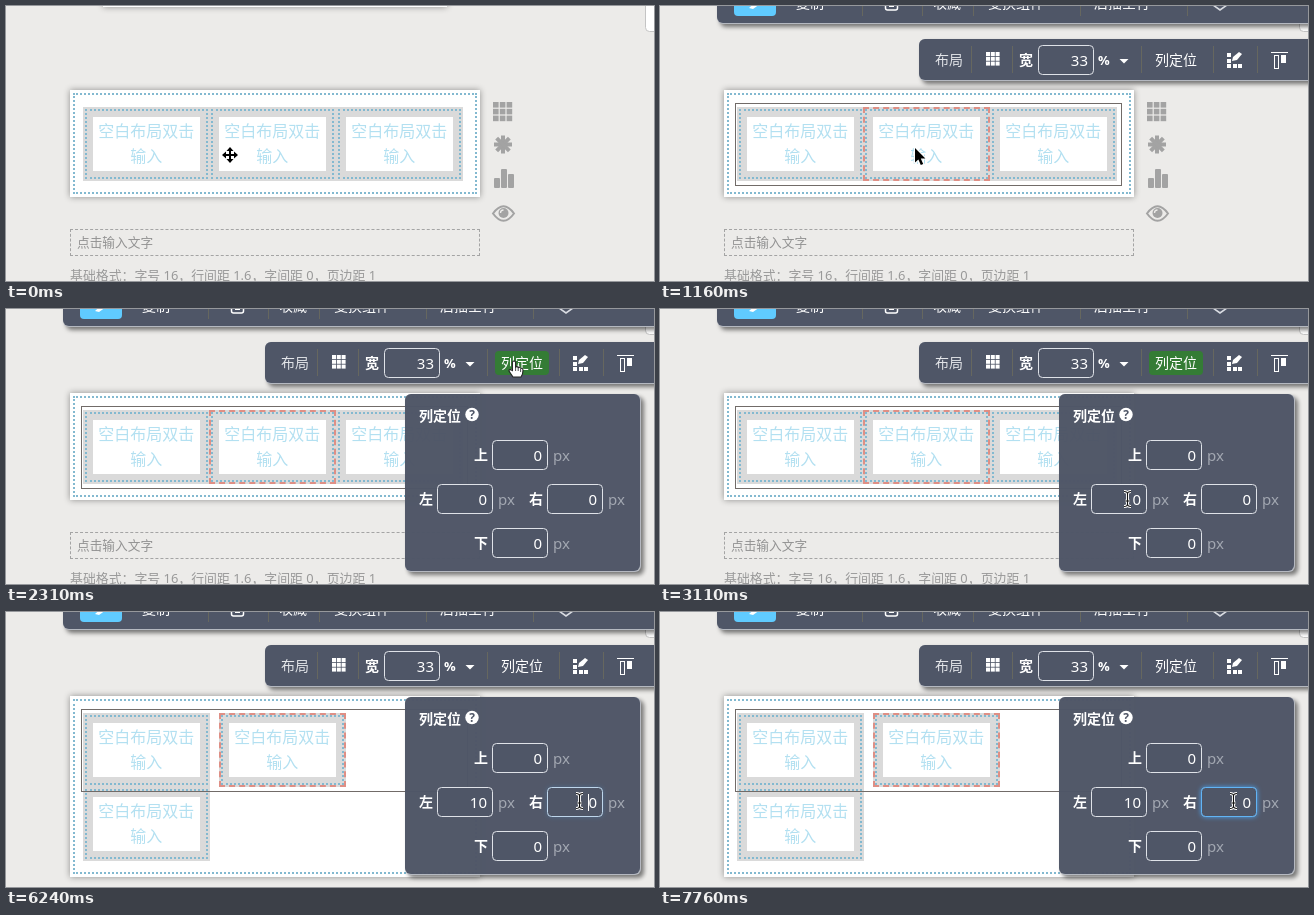
Animation of 648 by 275 pixels, one loop 8000 ms. Source, as an HTML page:

```html
<!DOCTYPE html>
<html lang="zh">
<head>
<meta charset="utf-8">
<style>
html, body { margin: 0; width: 100%; height: 100%; overflow: hidden; background: #ecebe9; }
svg { display: block; width: 648px; height: 275px; font-family: "Noto Sans", "Noto Sans CJK SC", sans-serif; }
.paper { filter: drop-shadow(0 0 3px rgba(0,0,0,.4)); }
.bar { filter: drop-shadow(3px 3px 2px rgba(0,0,0,.5)); }
.glow { filter: drop-shadow(0 0 2.5px #4aa3f0); }
.edge { box-sizing: border-box; width: 100%; height: 100%; }
</style>
</head>
<body>
<script>
const LOOP = 8000, DARK = '#4f5667', GREY = '#a3a3a3';

// Markup helpers
const rect = (x, y, w, h, fill, more = '') =>
  `<rect x="${x}" y="${y}" width="${w}" height="${h}" fill="${fill}" ${more}/>`;
const text = (x, y, s, size, fill, more = '') =>
  `<text x="${x}" y="${y}" font-size="${size}" fill="${fill}" ${more}>${s}</text>`;
const path = (d, fill, more = '') => `<path d="${d}" fill="${fill}" ${more}/>`;
const group = (id, body, more = '') => `<g id="${id}" ${more}>${body}</g>`;
const line = (color, w = 1) => `stroke="${color}" stroke-width="${w}"`;
const border = (x, y, w, h, style, id = '') =>
  `<foreignObject id="${id}" x="${x}" y="${y}" width="${w}" height="${h}">` +
  `<div class="edge" style="border:${style}"></div></foreignObject>`;
const grid = (x, y, size, step, fill) => [...Array(9).keys()]
  .map(i => rect(x + i % 3 * step, y + (i / 3 | 0) * step, size, size, fill)).join('');
const bold = 'font-weight="700"', medium = 'font-weight="500"';
const mid = 'text-anchor="middle"', end = 'text-anchor="end"';
const label = (x, y, s, weight = medium) => text(x, y, s, 14, '#fff', weight);
const DOTS = '2px dotted #83b9d0';

// Dark plate with a light lower right rim
const plate = (x, y, w, h) =>
  `<g class="bar">${rect(x, y, w, h, '#b4b8c0', 'rx="6"')}${rect(x, y, w - 1, h - 1, DARK, 'rx="6"')}</g>`;

function cell(i) {
  const x = Math.floor(77 + i * 126.67), c = x + 63.3;
  return group('cell' + i,
    rect(x, 101, 127, 74, '#dadada') +
    rect(x + 10, 111, 107, 54, '#fff') +
    border(x + 2, 103, 123, 70, DOTS) +
    (i == 1 ? border(x, 101, 127, 74, '2px dashed #df8f85', 'picked') : '') +
    text(c, 131, '空白布局双击', 16, '#b3e0f1', mid) +
    text(c, 156, '输入', 16, '#b3e0f1', mid));
}

function field(id, x, y, value) {
  const box = (color, more = '') =>
    rect(x + .5, y + .5, 55, 29, DARK, `rx="4" ${line(color)} ${more}`);
  return box('#dfe2e8') + box('#62b4f5', `id="${id}Glow" class="glow" opacity="0"`) +
    text(x + 50, y + 20.5, value, 15, '#fff', `id="${id}" ${medium} ${end}`);
}

const pxField = (id, x, y, name) =>
  label(x, y + 20, name, bold) + field(id, x + 18, y, '0') + text(x + 79, y + 20.5, 'px', 15, '#a2a7b1', medium);

const rules = (xs, y, h) => xs.map(x => rect(x, y, 1, h, '#66675f')).join('');

const page =
  rect(97, -20, 344, 21, '#fff', 'class="paper"') +
  rect(639.5, -10, 30, 35.5, '#fff', `rx="4" ${line('#c4c4c4')}`) +
  rect(64, 84, 410, 107, '#fff', 'id="sheet" class="paper"') +
  border(67, 87, 404, 101, DOTS, 'sheetDots') +
  cell(0) + cell(2) + cell(1) +
  rect(75.5, 97.5, 386, 82, 'none', `id="frame" ${line('#716b68')}`) +
  group('tools',
    grid(487, 96, 5.6, 6.8, GREY) +
    [0, 45, 90, 135].map(a => rect(495, 129.5, 4, 18, GREY, `transform="rotate(${a} 497 138.5)"`)).join('') +
    [[488, 172], [495, 163], [502, 168]].map(([x, y]) => rect(x, y, 6, 182 - y, GREY, 'rx="1"')).join('') +
    path('M487 207.5Q497.5 193 508 207.5Q497.5 222 487 207.5Z', 'none', line(GREY, 2)) +
    `<circle cx="497.5" cy="207" r="5" fill="${GREY}"/>` +
    path('M494.5 207a3 3 0 0 1 3-3', 'none', line('#ecebe9', 1.3))) +
  group('footer',
    border(64, 223, 410, 27, '1px dashed #a4a4a4') +
    text(71, 241, '点击输入文字', 12.7, '#929292', medium) +
    text(64, 274, '基础格式：字号 16，行间距 1.6，字间距 0，页边距 1', 12.9, '#999', medium));

const bars = group('bars',
  plate(57, -30, 700, 48) +
  rect(74, -20, 42, 30, '#60cbff', 'rx="4"') +
  path('M89 2l8-7l3 3l-7 5z', '#fff') +
  rules([202, 262, 313, 420, 527], -10, 20) +
  label(136, 2, '复制') + label(273, 2, '收藏') + label(328, 2, '变换组件') + label(434, 2, '后插空行') +
  rect(225.5, -9, 12, 13, 'none', `rx="2" ${line('#fff', 1.5)}`) + rect(229, -2, 5, 3, '#fff') +
  path('M553-1l7 5l7-5', 'none', line('#d9dce2', 1.6)) +
  plate(259, 33, 500, 42) +
  rules([311, 352, 481, 553, 597], 40, 27) +
  text(275, 59, '布局', 14, '#e3e5e9', medium) +
  grid(326, 46, 4, 4.8, '#fff') +
  label(359, 59, '宽', bold) + field('width', 378, 39, '33') +
  text(438, 59, '%', 13, '#fff', bold) +
  path('M459.5 53h9l-4.5 4.5z', '#fff') +
  rect(489, 42, 54, 24, '#347c35', 'id="active" rx="4"') +
  label(495, 59, '列定位') +
  [[567, 47], [567, 53], [567, 58], [573, 58], [578, 58]].map(([x, y]) => rect(x, y, 4, 4, '#fff')).join('') +
  path('M572 55l1-4l6-5l3 2l-5 6z', '#fff') +
  path('M611 46.5h17', 'none', line('#fff')) +
  rect(614.5, 49.5, 4, 13, 'none', line('#fff')) + rect(621, 49, 5, 8, '#fff'));

const panel = group('panel',
  group('plate', plate(399, 85, 236, 178), 'opacity=".98"') +
  label(413, 112, '列定位', bold) +
  '<circle cx="466" cy="105.5" r="6.7" fill="#fff"/>' +
  text(466, 110, '?', 12, DARK, `${bold} ${mid}`) +
  pxField('top', 468, 131, '上') + pxField('left', 413, 175, '左') +
  pxField('right', 523, 175, '右') + pxField('bottom', 468, 219, '下') +
  rect(0, 182, 1, 17, '#fff', 'id="caret"'));

const halo = 'stroke="#fff" stroke-linejoin="round" paint-order="stroke"';
const beam = 'M-3.5-7.5Q0-7.5 0-5Q0-7.5 3.5-7.5M0-5V5M-3.5 7.5Q0 7.5 0 5Q0 7.5 3.5 7.5M-2 2H2';
const pointers =
  group('move', path('M0-8l3.5 4H1v3h3v-2.5L8 0L4 3.5V1H1v3h2.5L0 8l-3.5-4H-1v-3h-3v2.5L-8 0l4-3.5V-1h3v-3h-2.5z',
    '#000', `${halo} stroke-width="1.6"`)) +
  group('arrow', path('M0 0V14.5L3.4 11.4L5.8 17L8.2 16L5.8 10.5H10.4Z', '#000', `${halo} stroke-width="2"`)) +
  group('hand', path('M-1.6 1Q0-1 1.6 1V6Q3 5 4.2 6.5Q5.6 5.6 6.6 7.2Q9 7 9 9.5Q9 13 7 16H-1L-5 10Q-5 7.5-1.6 9.5Z',
    '#fff', line('#222', 1.1)) + path('M1.6 6v4M4.2 7v3M6.6 8v3', 'none', line('#222', .8))) +
  group('ibeam', path(beam, 'none', line('#fff', 3)) + path(beam, 'none', line('#111', 1.1)));

document.body.innerHTML =
  `<svg viewBox="0 0 648 275">${page}${bars}${panel}${group('cursor', pointers)}</svg>`;

const el = id => document.getElementById(id);
const show = (id, on) => el(id).setAttribute('visibility', on ? 'visible' : 'hidden');
const set = (id, attrs) => Object.entries(attrs).forEach(([k, v]) => el(id).setAttribute(k, v));

// Pointer moves: first step, last step, number of steps, waypoints
const moves = [
  [90, 530, 6, [[224, 149], [215, 148], [224, 155], [243, 152], [255, 142]]],
  [1430, 2050, 8, [[255, 137], [300, 122], [400, 88], [480, 66], [508, 52]]],
  [2580, 3110, 7, [[508, 52], [512, 75], [500, 130], [475, 183], [467.5, 190]]],
  [5610, 5700, 2, [[467.5, 190], [520, 187], [573.5, 189]]]
];

function pointerAt(t) {
  const [a, b, n, pts] = moves.filter(m => t >= m[0]).pop() || moves[0];
  const step = t < a ? 0 : Math.min(n, Math.floor((t - a) / (b - a) * (n - 1) + 1e-6) + 1);
  const u = step / n * (pts.length - 1), i = Math.min(pts.length - 2, Math.floor(u));
  return [0, 1].map(k => pts[i][k] + (pts[i + 1][k] - pts[i][k]) * (u - i));
}

const between = (t, a, b) => t >= a && t < b;

function draw(t) {
  // Selection and toolbars
  const shown = t < 1070 ? 0 : t < 1160 ? .5 : 1;
  for (const id of ['bars', 'picked', 'frame']) set(id, { opacity: shown });
  show('active', between(t, 2310, 3470));
  show('panel', t >= 2310);
  show('tools', t < 2310);

  // The wider offset pushes the third column to a new row
  const wrap = t >= 6240;
  set('sheet', { height: wrap ? 181 : 107 });
  set('sheetDots', { height: wrap ? 175 : 101 });
  set('cell1', { transform: `translate(${wrap ? 10 : 0} 0)` });
  set('cell2', { transform: wrap ? 'translate(-253 74)' : '' });
  set('footer', { transform: `translate(0 ${wrap ? 74 : 0})` });

  // Typing
  el('left').textContent = t < 3730 ? '0' : t < 4980 ? '' : t < 5430 ? '1' : '10';
  set('leftGlow', { opacity: wrap || t < 3470 ? 0 : t < 3560 ? .5 : 1 });
  set('rightGlow', { opacity: !wrap ? 0 : t < 6330 ? .25 : t < 6420 ? .5 : 1 });
  const spans = [[3560, 3730, 472], [4980, 5880, 479], [6240, 6770, 582], [7310, 7760, 582]];
  const caret = spans.find(([a, b]) => between(t, a, b));
  show('caret', caret);
  if (caret) set('caret', { x: caret[2] });

  // Pointer
  const [x, y] = pointerAt(t);
  const kind = t < 1070 ? 'move'
    : between(t, 1950, 2660) ? 'hand'
    : t < 3020 || between(t, 5610, 5700) ? 'arrow' : 'ibeam';
  for (const id of ['move', 'arrow', 'hand', 'ibeam']) show(id, id == kind);
  set('cursor', { transform: `translate(${x} ${y})` });
}

const start = performance.now();
function tick() {
  draw((performance.now() - start) % LOOP);
  requestAnimationFrame(tick);
}
tick();
</script>
</body>
</html>
```
